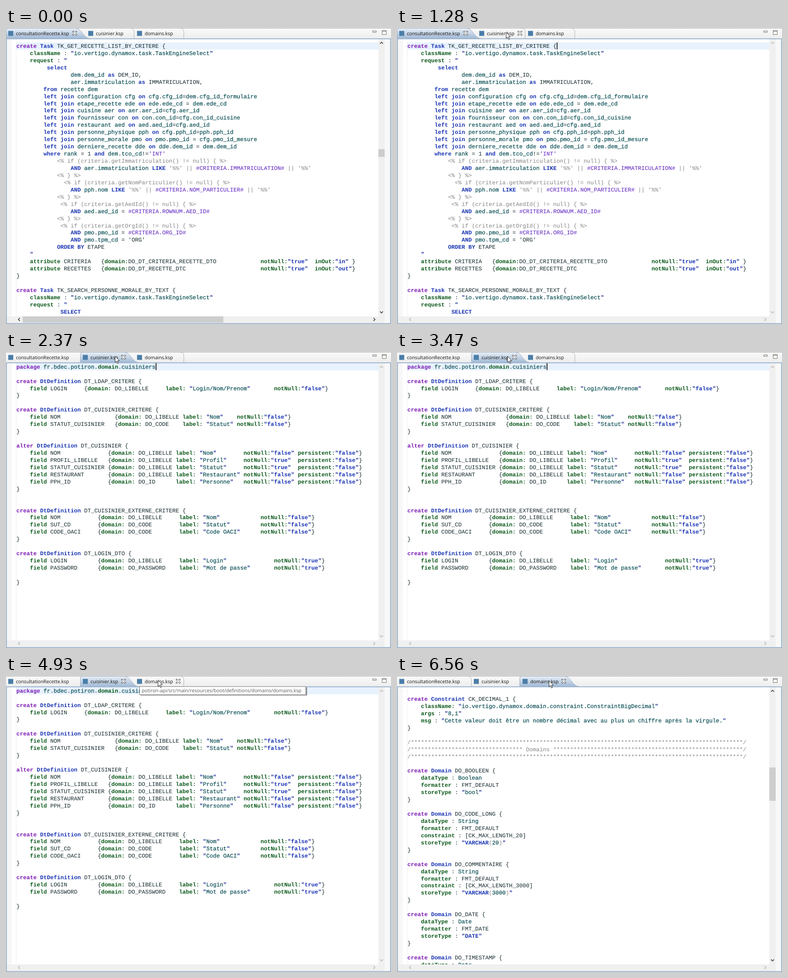
Recreate the animation shown at these times as an HTML page. Size 852 by 657 pixels, loop 8 s.

```html
<!DOCTYPE html>
<html lang="fr">
<head>
<meta charset="utf-8">
<title>Editor tabs</title>
<style>
html, body { margin: 0; width: 100%; height: 100%; overflow: hidden; background: #fff; }
svg { display: block; width: 852px; height: 657px; }
text { white-space: pre; text-rendering: geometricPrecision; }
.code { font: 12.5px "Liberation Mono", monospace; fill: #14282c; }
.ui { font: 10.55px "Open Sans", sans-serif; fill: #111; }
.tip { font: 10.7px "Open Sans", sans-serif; fill: #575757; }
.k, .b, .g { font-weight: bold; }
.k { fill: #7d1cb4; }
.b { fill: #1a35b4; }
.g { fill: #0c5a1c; }
.t { fill: #0b4f55; stroke: #0b4f55; stroke-width: .25px; }
.c { fill: #858585; }
.h { fill: #5a1fc0; }
.q { fill: #23309c; }
</style>
</head>
<body>
<svg id="stage" viewBox="0 0 852 657">
  <defs>
    <linearGradient id="bar" x2="0" y2="1"><stop stop-color="#fafafa"/><stop offset="1" stop-color="#ededed"/></linearGradient>
    <linearGradient id="sel" x2="0" y2="1"><stop stop-color="#e9eff6"/><stop offset="1" stop-color="#9fb8d4"/></linearGradient>
    <clipPath id="view"><path d="M2 24H824V640H2z"/></clipPath>
  </defs>
  <rect width="852" height="657" fill="#fff"/>
  <rect width="852" height="24" fill="url(#bar)"/>
  <path d="M0 .5H852" stroke="#b4b4b4"/>
  <path d="M2 24H13V640H2z" fill="#f7f7f7"/>
  <path d="M22.5 24V640" stroke="#eeeeee"/>
  <path d="M824 24H838V640H824zM2 640H838V655H2z" fill="#f0f0f0"/>
  <path d="M838 24H850V655H838z" fill="#f8f8f8"/>
  <g fill="none" stroke="#6c6c60">
    <path d="M811.5 6.5H819.5V9.5H811.5z" fill="#fff"/>
    <path d="M832.5 5.5H841.5V14.5H832.5zM832.5 7.5H841.5" fill="#fff"/>
  </g>
  <g id="pages" clip-path="url(#view)"></g>
  <g id="tabs"></g>
  <path d="M0 24H852M1 24V657M851 24V657M0 656H852" fill="none" stroke="#9fb6d0" stroke-width="2"/>
  <g id="bars"></g>
  <rect id="caret" width="1.6" height="15.5"/>
  <g id="tip"></g>
  <circle id="click" r="10" fill="#ffee22" fill-opacity=".72"/>
  <path id="mouse" d="M.5 .5V14L3.6 11.2 5.8 16.6 8 15.7 5.8 10.4H10z" fill="#fff" stroke="#111" stroke-width=".9"/>
</svg>
<script>
const $ = id => document.getElementById(id);
const LOOP = 8000, LINE = 15.94;
const sp = n => ' '.repeat(n);
const stars = n => '*'.repeat(n);

const queryPage = `create Task TK_GET_RECETTE_LIST_BY_CRITERE {
    className : "io.vertigo.dynamox.task.TaskEngineSelect"
    request : "
         select
                dem.dem_id as DEM_ID,
                aer.immatriculation as IMMATRICULATION,
        from recette dem
        left join configuration cfg on cfg.cfg_id=dem.cfg_id_formulaire
        left join etape_recette ede on ede.ede_cd = dem.ede_cd
        left join cuisine aer on aer.aer_id=cfg.aer_id
        left join fournisseur con on con.con_id=cfg.con_id_cuisine
        left join restaurant aed on aed.aed_id=cfg.aed_id
        left join personne_physique pph on cfg.pph_id=pph.pph_id
        left join personne_morale pmo on pmo.pmo_id = cfg.pmo_id_mesure
        left join derniere_recette dde on dde.dem_id = dem.dem_id
        where rank = 1 and dem.tco_cd!='INT'
            <% if (criteria.getImmatriculation() != null) { %>
                AND aer.immatriculation LIKE '%%' || #CRITERIA.IMMATRICULATION# || '%%'
            <% } %>
              <% if (criteria.getNomParticulier() != null) { %>
                AND pph.nom LIKE '%%' || #CRITERIA.NOM_PARTICULIER# || '%%'
            <% } %>
             <% if (criteria.getAedId() != null) { %>
                AND aed.aed_id = #CRITERIA.ROWNUM.AED_ID#
            <% } %>
             <% if (criteria.getOrgId() != null) { %>
                AND pmo.pmo_id = #CRITERIA.ORG_ID#
                AND pmo.tpm_cd = 'ORG'
            ORDER BY ETAPE
    "
    attribute CRITERIA   {domain:DO_DT_CRITERIA_RECETTE_DTO${sp(13)}notNull:"true"  inOut:"in" }
    attribute RECETTES   {domain:DO_DT_RECETTE_DTC${sp(22)}notNull:"true"  inOut:"out"}
}

create Task TK_SEARCH_PERSONNE_MORALE_BY_TEXT {
    className : "io.vertigo.dynamox.task.TaskEngineSelect"
    request : "
             SELECT`;

// A field row; at = columns of "{domain", "label" and "notNull"
function field(at, name, type, label, notNull, persistent) {
  let s = `    field ${name}`.padEnd(at[0]) + `{domain: ${type}`;
  s = s.padEnd(at[1]) + `label: "${label}"`;
  s = s.padEnd(at[2]) + `notNull:"${notNull}"`;
  return (persistent ? s.padEnd(at[2] + 16) + 'persistent:"false"' : s) + '}';
}
const crit = [29, 49, 65], alt = [27, 47, 67], ext = [24, 48, 72], log = [24, 48, 76];
const cookPage = [
  'package fr.bdec.potiron.domain.cuisiniers', '',
  'create DtDefinition DT_LDAP_CRITERE {',
  field([20, 44, 76], 'LOGIN', 'DO_LIBELLE', 'Login/Nom/Prenom', false), '}', '',
  'create DtDefinition DT_CUISINIER_CRITERE {',
  field(crit, 'NOM', 'DO_LIBELLE', 'Nom', false),
  field(crit, 'STATUT_CUISINIER', 'DO_CODE', 'Statut', false), '}', '',
  'alter DtDefinition DT_CUISINIER {',
  field(alt, 'NOM', 'DO_LIBELLE', 'Nom', false, 1),
  field(alt, 'PROFIL_LIBELLE', 'DO_LIBELLE', 'Profil', true, 1),
  field(alt, 'STATUT_CUISINIER', 'DO_LIBELLE', 'Statut', true, 1),
  field(alt, 'RESTAURANT', 'DO_LIBELLE', 'Restaurant', false, 1),
  field(alt, 'PPH_ID', 'DO_ID', 'Personne', false, 1), '}', '', '',
  'create DtDefinition DT_CUISINIER_EXTERNE_CRITERE {',
  field(ext, 'NOM', 'DO_LIBELLE', 'Nom', false),
  field(ext, 'SUT_CD', 'DO_CODE', 'Statut', false),
  field(ext, 'CODE_OACI', 'DO_CODE', 'Code OACI', false), '}', '',
  'create DtDefinition DT_LOGIN_DTO {',
  field(log, 'LOGIN', 'DO_LIBELLE', 'Login', true),
  field(log, 'PASSWORD', 'DO_PASSWORD', 'Mot de passe', true), '', '}'
].join('\n');

const rule = `/${stars(98)}/`;
const domain = (name, type, fmt, store, max) => `create Domain DO_${name} {
    dataType : ${type}
    formatter : FMT_${fmt}
${max ? `    constraint : [CK_MAX_LENGTH_${max}]\n` : ''}    storeType : "${store}"
}
`;
const domainPage = `create Constraint CK_DECIMAL_1 {
    className: "io.vertigo.dynamox.domain.constraint.ConstraintBigDecimal"
    args : "8,1"
    msg : "Cette valeur doit être un nombre décimal avec au plus un chiffre après la virgule."
}

${rule}
/${stars(33)} Domains ${stars(56)}/
${rule}

` + [
  domain('BOOLEEN', 'Boolean', 'DEFAULT', 'bool'),
  domain('CODE_LONG', 'String', 'DEFAULT', 'VARCHAR(20)', 20),
  domain('COMMENTAIRE', 'String', 'DEFAULT', 'VARCHAR(3000)', 3000),
  domain('DATE', 'Date', 'DATE', 'DATE'),
  'create Domain DO_TIMESTAMP {\n    dataType : Date'
].join('\n');

// Syntax colouring
const esc = s => s.replace(/&/g, '&amp;').replace(/</g, '&lt;');
const span = (cls, s) => `<tspan class="${cls}">${esc(s)}</tspan>`;
const TOKEN = /^\/\*.*$|<%.*?%>|'%%'|'INT'|\|\||#[\w.]+#|"[^"]*"|\w+:?|\s+|./g;
const words = {
  k: /^(create|alter|package)$/,
  b: /^(Task|DtDefinition|Domain|Constraint|select|SELECT|as|from|left|join|on|where|and|AND|LIKE|ORDER|BY)$/,
  g: /^(className|request|attribute|domain|notNull|inOut|field|label|persistent|args|msg|dataType|formatter|storeType|constraint):?$/,
  t: /[a-z]/
};
function quoted(s) {
  const inner = s.slice(1, -1), m = inner.match(/^(VARCHAR)(\()(\d+)(\))$/);
  const body = m ? span('b', m[1]) + span('c', m[2]) + span('t', m[3]) + span('c', m[4])
    : span(/^(true|false|in|out|DATE)$/.test(inner) ? 'b' : 't', inner);
  return span('q b', '"') + body + span('q b', '"');
}
function paint(tok) {
  if (/^(\/\*|<%|'%%|\|\|)/.test(tok)) return span('c', tok);
  if (/^(#|'INT)/.test(tok)) return span('h', tok);
  if (/^".*"$/.test(tok)) return quoted(tok);
  if (tok === '"') return span('q b', tok);
  if (/^\w/.test(tok)) {
    for (const cls in words) if (words[cls].test(tok)) return span(cls, tok);
  }
  return esc(tok);
}
function pageMarkup(src, y, lit) {
  const rows = src.split('\n').map((s, i) =>
    s && `<text class="code" x="23" y="${(y + i * LINE).toFixed(2)}">${s.match(TOKEN).map(paint).join('')}</text>`);
  return `<g>${lit ? `<rect x="23" y="${y - 12}" width="801" height="16" fill="#e8f2fe"/>` : ''}${rows.join('')}</g>`;
}
$('pages').innerHTML = pageMarkup(queryPage, 44, 1) + pageMarkup(cookPage, 36.7, 1) + pageMarkup(domainPage, 55, 0);

// Tab strip
const names = ['consultationRecette.ksp', 'cuisinier.ksp', 'domains.ksp'];
const layouts = [
  { left: 0, icons: [5, 182, 290], close: 152, edges: [283, 393] },
  { left: 164, icons: [5, 170, 290], close: 260, edges: [393] },
  { left: 271, icons: [5, 170, 278], close: 369, edges: [164] }
];
function cross(x) {
  const d = `M${x - 3.2} 8.3L${x + 3.2} 14.7M${x + 3.2} 8.3L${x - 3.2} 14.7`;
  return `<path d="${d}" stroke="#77777a" stroke-width="3.6" stroke-linecap="square"/><path d="${d}" stroke="#fff" stroke-width="1.7"/>`;
}
function tabMarkup(page, hover) {
  const { left, icons, close: c, edges } = layouts[page];
  let s = edges.map(x => `<path d="M${x - 8} .5Q${x + .5} .5 ${x + .5} 8V23" fill="none" stroke="#b2b2b2"/>`).join('');
  s += `<path d="M${left + .5} 24V6Q${left + .5} .5 ${left + 6} .5H${c + 2}C${c + 17} 1 ${c + 18} 23 ${c + 35} 23.5" fill="url(#sel)" stroke="#a3b1c2"/>`;
  icons.forEach((x, i) => {
    s += `<rect x="${x}" y="6.5" width="11" height="11" fill="#4a7ea8"/><text class="ui" x="${x + 17}" y="16">${names[i]}</text>`;
  });
  return s + cross(c) + (hover ? cross(hover) : '');
}

// Scroll bars: v = [y, height], h = [x, width]
function barMarkup(v, h) {
  const arrow = (on, x, y, turn) =>
    `<path transform="translate(${x} ${y}) rotate(${turn})" d="M-3.3 1.8L0 -1.6 3.3 1.8" fill="none" stroke="${on ? '#444' : '#bcbcbc'}" stroke-width="1.7"/>`;
  return arrow(v, 831, 33, 0) + arrow(v, 831, 631, 180) + arrow(h, 29, 647, -90) + arrow(h, 815, 647, 90) +
    (v ? `<rect x="824" y="${v[0]}" width="14" height="${v[1]}" fill="#cdcdcd"/>` : '') +
    (h ? `<rect x="${h[0]}" y="640" width="${h[1]}" height="14" fill="#cdcdcd"/>` : '');
}

const cookPath = 'potiron-api/src/main/resources/mda/model/cuisinier.ksp';
const domainPath = 'potiron-api/src/main/resources/boot/definitions/domains/domains.ksp';
function tipMarkup(x, y, w, label) {
  return `<rect x="${x + 3}" y="${y + 3}" width="${w}" height="18" fill="#000" opacity=".2"/>
    <rect x="${x + 1.5}" y="${y + 1.5}" width="${w}" height="18" fill="#000" opacity=".28"/>
    <rect x="${x + .5}" y="${y + .5}" width="${w - 1}" height="18" fill="#fff" stroke="#767676"/>
    <text class="tip" x="${x + 5.5}" y="${y + 13}">${label}</text>`;
}

// Pointer holds each place until the next time
const moves = [
  [500, 247, 1], [580, 243, 5], [660, 241, 8], [840, 241, 9],
  [3470, 244, 9], [3540, 252, 8], [3620, 268, 6], [3690, 280, 6], [3770, 288, 6], [3850, 294, 6],
  [3930, 303, 6], [4000, 312, 7], [4080, 319, 7], [4160, 324, 8], [4240, 326, 8],
  [4320, 328, 8], [4390, 330, 8], [4470, 331, 8], [4630, 333, 8], [4700, 334, 8], [4780, 335, 8],
  [4930, 336, 9], [6560, 336, 10]
];
const within = (t, a, b) => t >= a && t < b;
const show = (el, on) => el.setAttribute('display', on ? 'inline' : 'none');
const cache = {};
function fill(id, html) {
  if (cache[id] !== html) $(id).innerHTML = cache[id] = html;
}

function draw(t) {
  const page = t < 1350 ? 0 : t < 6180 ? 1 : 2;
  [...$('pages').children].forEach((g, i) => show(g, i === page));

  const hover = within(t, 500, 1350) ? 272 : within(t, 3770, 6180) ? 381 : 0;
  fill('tabs', tabMarkup(page, hover));
  fill('bars', t < 1280 ? barMarkup([269, 17], [37, 444]) : barMarkup(page === 2 ? [203, 74] : null, null));

  const caret = $('caret');
  caret.setAttribute('x', page ? 331.3 : 353.5);
  caret.setAttribute('y', page ? 24.7 : 32);
  show(caret, within(t, 1110, 1890) || within(t, 2370, 2920) || within(t, 3470, 6180));

  fill('tip', within(t, 1030, 1110) ? tipMarkup(241, 27, 298, cookPath)
    : within(t, 3620, 3850) ? tipMarkup(270, 25, 298, cookPath)
    : within(t, 3850, 5940) ? tipMarkup(295, 23, 369, domainPath) : '');

  const at = moves.filter(m => m[0] <= t).pop();
  show($('mouse'), at);
  show($('click'), within(t, 1110, 1280) || within(t, 5940, 6090));
  if (at) {
    const [, x, y] = at;
    $('mouse').setAttribute('transform', `translate(${x} ${y})`);
    $('click').setAttribute('cx', x + 1);
    $('click').setAttribute('cy', y + 2);
  }
}

const start = performance.now();
function tick() {
  draw((performance.now() - start) % LOOP);
  requestAnimationFrame(tick);
}
tick();
</script>
</body>
</html>
```
